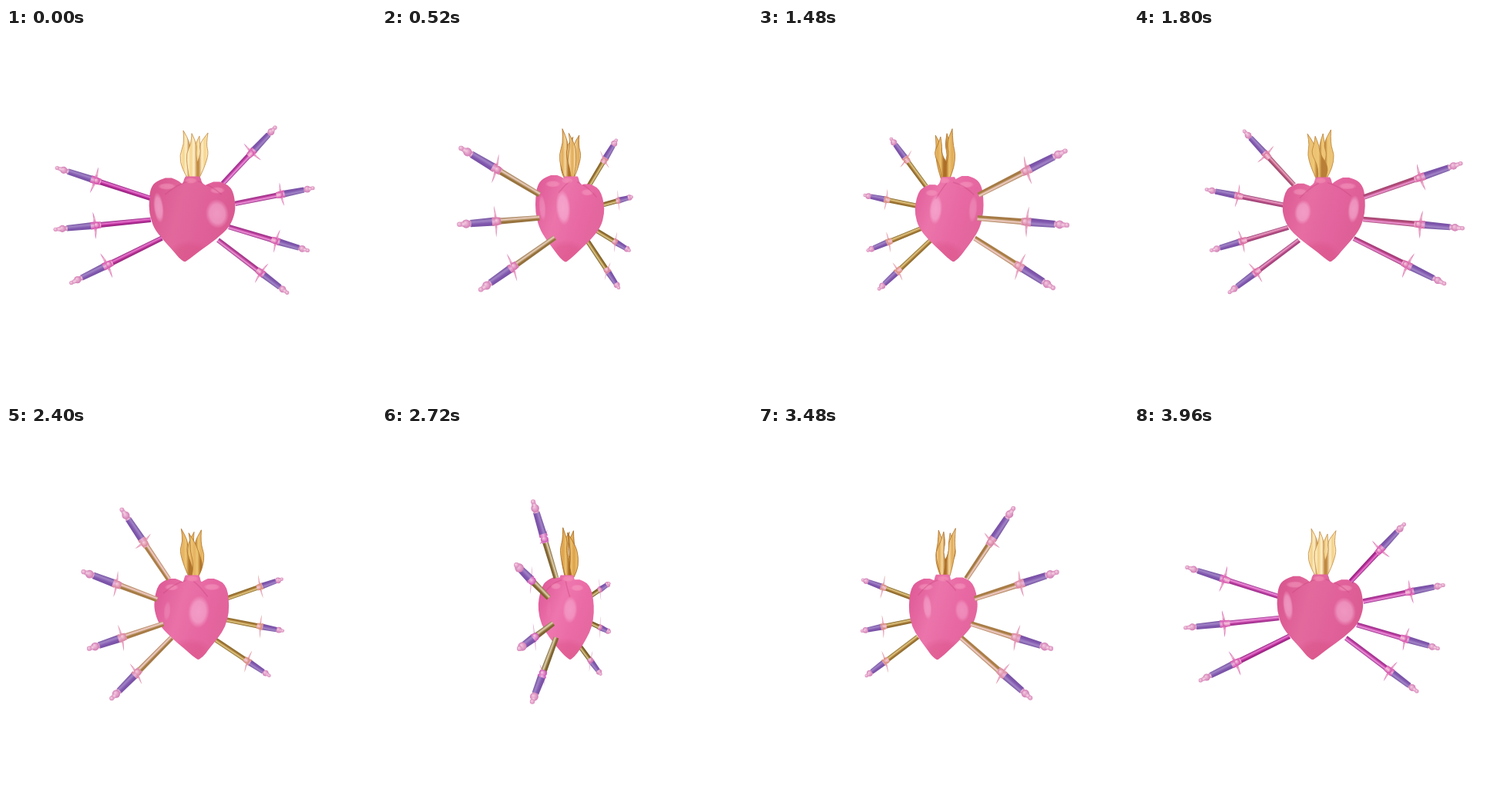
An HTML page with a canvas that plays this animation: 480 px wide and 480 px high, repeating every 4000 ms.

```html
<!DOCTYPE html>
<html lang="en">
<head>
<meta charset="utf-8">
<title>Turning heart</title>
<style>
html, body { margin: 0; width: 100%; height: 100%; overflow: hidden; background: #fff; }
canvas { display: block; width: 100%; height: 100%; }
</style>
</head>
<body>
<canvas id="stage" width="480" height="480"></canvas>
<script>
const ctx = document.getElementById('stage').getContext('2d');
const LOOP = 4000, STEP = 40;
const AXIS = 243, HORIZON = 288, CAMERA = 645;
const RAD = Math.PI / 180;
let turn = 0;

const lerp = (a, b, k) => a + (b - a) * k;

// Model space: x right, y down from the horizon, z towards the viewer.
function project([x, y, z]) {
  const c = Math.cos(turn), s = Math.sin(turn);
  const depth = z * c - x * s;
  const scale = 1 / (1 - depth / CAMERA);
  return { x: AXIS + (x * c + z * s) * scale, y: HORIZON + y * scale, z: depth, s: scale };
}

function mix(a, b, k) {
  const part = (hex, i) => parseInt(hex.substr(1 + i * 2, 2), 16);
  return `rgb(${[0, 1, 2].map(i => Math.round(lerp(part(a, i), part(b, i), k)))})`;
}

function blend(stops, k) {
  const n = Math.min(1, Math.max(0, k)) * (stops.length - 1);
  const i = Math.min(stops.length - 2, Math.floor(n));
  return mix(stops[i], stops[i + 1], n - i);
}

function across(x0, y0, x1, y1, colors) {
  const g = ctx.createLinearGradient(x0, y0, x1, y1);
  colors.forEach((c, i) => g.addColorStop(i / (colors.length - 1), c));
  return g;
}

function rod(p, q, wp, wq, colors) {
  const len = Math.hypot(q.x - p.x, q.y - p.y) || 1;
  const nx = -(q.y - p.y) / len, ny = (q.x - p.x) / len;
  const a = wp * p.s / 2, b = wq * q.s / 2, m = Math.max(a, b);
  ctx.fillStyle = across(p.x - nx * m, p.y - ny * m, p.x + nx * m, p.y + ny * m, colors);
  ctx.beginPath();
  ctx.moveTo(p.x - nx * a, p.y - ny * a);
  ctx.lineTo(q.x - nx * b, q.y - ny * b);
  ctx.lineTo(q.x + nx * b, q.y + ny * b);
  ctx.lineTo(p.x + nx * a, p.y + ny * a);
  ctx.fill();
}

function ball(p, r, light, dark) {
  r *= p.s;
  const g = ctx.createRadialGradient(p.x - r * .3, p.y - r * .3, 0, p.x, p.y, r);
  g.addColorStop(0, light);
  g.addColorStop(1, dark);
  ctx.fillStyle = g;
  ctx.beginPath();
  ctx.arc(p.x, p.y, r, 0, 7);
  ctx.fill();
}

// Swords: tip and entry points as radius, azimuth, height; then size.
const polar = (r, deg, y) => [r * Math.sin(deg * RAD), y, r * Math.cos(deg * RAD)];
const swords = [
  [172, -86.5, -104, 56, -87, -67, 1.09],
  [174, -86.5, -26.5, 55, -88, -39, 1.09],
  [153, -83.5, 40.5, 42, -72, -15, 1.09],
  [106, 93.5, -159, 38, 90, -86, .98],
  [158, 96, -82, 54, 88, -60, .98],
  [151, 96, 0, 46, 90, -30, .98],
  [124, 97, 55.5, 32, 85, -13, .98]
].map(v => {
  const tip = polar(v[0], v[1], v[2]), end = polar(v[3], v[4], v[5]);
  const length = Math.hypot(...tip.map((c, i) => end[i] - c));
  const dir = tip.map((c, i) => (end[i] - c) / length);
  const flat = Math.hypot(dir[0], dir[2]);
  const up = [dir[0] * dir[1] / flat, -flat, dir[2] * dir[1] / flat];
  return { tip, length, dir, up, size: v[6] };
});

function drawSword({ tip, length, dir, up, size }) {
  const at = (d, side = 0) => project(tip.map((c, i) => c + dir[i] * d * size + up[i] * side * size));
  const head = project(tip);
  const near = head.z > 0;
  const facing = 1 - Math.abs(head.z) / Math.hypot(tip[0], tip[2]);
  const k = Math.min(1, facing * 1.1);
  const edge = blend(near ? ['#69562b', '#c28d60', '#8d247c'] : ['#604a20', '#92712f', '#97308a'], k);
  const shine = blend(near ? ['#ded4a8', '#fccfdb', '#ea74d0'] : ['#d9ca8c', '#e6c780', '#f08fdc'], k);
  const shade = blend(near ? ['#80652f', '#b28243', '#b42a94'] : ['#8a6c30', '#ad7c38', '#b93b9d'], k);
  const metal = blend(near ? ['#c746b8', '#dd9590', '#d147a8'] : ['#cc62ba', '#d9925a', '#d24aa9'], k);

  const blade = () => {
    rod(at(45), at(length / size), 7, 6.4, [edge, shine, shade, edge]);
    rod(at(45), at(51), 9, 8, [metal, '#f7c6dc', metal]);
  };
  const guard = () => {
    const a = at(43, 16), b = at(43, -16), inner = at(49), outer = at(42);
    const c = at(46);
    ctx.fillStyle = across(a.x, a.y, b.x, b.y, [metal, '#efb5d0', metal, '#eeb0ce', metal]);
    ctx.beginPath();
    ctx.moveTo(a.x, a.y);
    ctx.quadraticCurveTo(inner.x, inner.y, b.x, b.y);
    ctx.quadraticCurveTo(outer.x, outer.y, a.x, a.y);
    ctx.fill();
    ball(c, 4.2, '#f8cfe2', metal);
  };
  const grip = () => {
    rod(at(11), at(41), 7.4, 9, ['#73519f', '#a183c6', '#8057ae', '#7650a2']);
    rod(at(39), at(43), 9.5, 9.5, [metal, '#e9b3dc', metal]);
  };
  const pommel = () => {
    rod(at(6), at(12), 5, 6.5, ['#c57cb2', '#f1c6e0', '#c47bb0']);
    ball(at(6), 4.5, '#f6cce2', '#d17cb4');
    rod(at(-2), at(4), 4, 6, ['#d58aba', '#f5cee2', '#ce80b4']);
    ball(at(-2), 2.6, '#f8d4e5', '#d98abc');
  };
  const parts = [blade, guard, grip, pommel];
  (near ? parts : parts.reverse()).forEach(draw => draw());
}

// Solid stacks: rows of height, centre x, half width, half depth.
const lobes = [
  [[195, -32, 4, 4], [199, -33, 15, 13], [208, -32, 23, 19], [222, -28, 29, 23], [240, -25, 32, 25],
   [260, -20, 31, 24], [275, -17, 22, 19], [290, -13, 12, 12], [299, -12, 6, 6], [303, -11, 1, 1]],
  [[200, 30, 4, 4], [204, 30, 15, 12], [212, 28, 23, 18], [226, 25, 29, 23], [240, 22, 32, 25],
   [258, 16, 31, 24], [274, 6, 24, 19], [290, -5, 12, 12], [299, -10, 6, 6], [303, -11, 1, 1]],
  [[193, -1, 9, 8], [196, -1, 11, 9], [202, -1, 12, 10], [207, -1, 22, 14], [222, 0, 30, 20],
   [250, -2, 30, 22], [280, -8, 18, 15], [302, -11, 2, 2]]
];

// Flame tongues: rows of height, x, z, half width.
const tongues = [
  [[196, -1, -2, 5], [182, -5, -5, 7], [164, 5, -9, 6], [152, 5, -5, 3.5], [140, 8, -1, 0]],
  [[196, 2, 0, 5], [182, 8, 1, 6], [163, 15, 2, 5], [151, 12, 0, 4.5], [136, 19, 0, 0]],
  [[196, -2, 0, 5], [182, -8, 0, 7], [165, -13, 0, 5], [151, -7, 1, 5], [133, -13, 0, 0]],
  [[196, 0, 2, 5], [180, -1, 5, 7], [164, -3, 8, 6], [152, 1, 5, 4], [137, -2, 1, 0]]
];

function sides(path, rows) {
  const run = pts => {
    path.lineTo(pts[0][0], pts[0][1]);
    for (let i = 1; i < pts.length - 1; i++) {
      const [x, y] = pts[i], [nx, ny] = pts[i + 1];
      path.quadraticCurveTo(x, y, (x + nx) / 2, (y + ny) / 2);
    }
    path.lineTo(...pts[pts.length - 1]);
  };
  path.moveTo(rows[0].x - rows[0].w, rows[0].y);
  run(rows.map(r => [r.x - r.w, r.y]));
  run(rows.map(r => [r.x + r.w, r.y]).reverse());
  path.closePath();
}

function drawFlame() {
  const front = Math.cos(turn), side = Math.abs(Math.sin(turn));
  const edge = mix('#c28b42', '#a5651d', side);
  const glow = front > 0 ? mix('#fff0cb', '#f3d190', side) : mix('#f0cb78', '#ecc26f', side);
  const rows = tongues.map(t => t.map(([y, x, z, w]) => {
    const p = project([x, y - HORIZON, z]);
    return { ...p, w: w * p.s * (1 - .25 * side) };
  }));
  rows.sort((a, b) => a[2].z - b[2].z).forEach(t => {
    const path = new Path2D(), m = t[2];
    sides(path, t);
    ctx.fillStyle = across(m.x - 8, 0, m.x + 8, 0, [edge, glow, mix('#f5d48c', '#d99a42', side), glow, edge]);
    ctx.fill(path);
    ctx.strokeStyle = edge;
    ctx.lineWidth = .8;
    ctx.stroke(path);
  });
}

// Reflections: time, x, y, width, height, opacity.
const glints = [
  [[0, 198, 233, 13, 40, .6], [520, 208, 233, 9, 34, .35], [1120, 220, 235, 7, 34, 0], [1121, 272, 235, 7, 34, 0],
   [1800, 285, 235, 15, 36, .6], [2400, 250, 241, 28, 42, .6], [3040, 238, 236, 10, 28, .4], [4000, 198, 233, 13, 40, .6]],
  [[0, 274, 241, 30, 38, .6], [520, 235, 233, 19, 46, .65], [1160, 242, 232, 12, 46, .6], [1800, 219, 239, 22, 32, .6],
   [2400, 209, 240, 9, 26, .25], [2800, 218, 238, 6, 22, 0], [2801, 258, 238, 6, 22, 0],
   [3040, 257, 238, 9, 22, .3], [4000, 274, 241, 30, 38, .6]]
];

function soft(x, y, w, h, color, alpha, tilt = 0) {
  ctx.save();
  ctx.translate(x, y);
  ctx.rotate(tilt);
  ctx.scale(w / 2, h / 2);
  const g = ctx.createRadialGradient(0, 0, 0, 0, 0, 1);
  g.addColorStop(0, `rgba(${color},${alpha})`);
  g.addColorStop(.65, `rgba(${color},${alpha * .85})`);
  g.addColorStop(1, `rgba(${color},0)`);
  ctx.fillStyle = g;
  ctx.fillRect(-1, -1, 2, 2);
  ctx.restore();
}

function drawHeart(time) {
  const c = Math.cos(turn), s = Math.sin(turn);
  const path = new Path2D();
  lobes.forEach(rows => sides(path, rows.map(([y, x, a, b]) => {
    const p = project([x, y - HORIZON, 4]);
    return { ...p, w: Math.hypot(a * c, b * s) * p.s };
  })));
  const half = 27 + 29 * Math.abs(c), side = Math.abs(s);
  ctx.fillStyle = across(AXIS - half, 225, AXIS + half, 255,
    [mix('#d9578f', '#e25e9c', side), mix('#e2689c', '#ef78b0', side),
     mix('#e0609a', '#eb6ba6', side), mix('#d8598e', '#e56aa0', side)]);
  ctx.fill(path);

  ctx.save();
  ctx.clip(path);
  soft(AXIS - 4, 298, 62, 46, '208,70,116', .32);
  // Lobe crowns and the folds beside the collar
  [[-34, -82, 4, 24], [31, -77, 4, 20]].forEach(([x, y, z, w]) => {
    const p = project([x, y, z]);
    soft(p.x, p.y, w * (.5 + .5 * Math.abs(c)), 9, '249,166,199', .5);
  });
  ctx.lineWidth = 1.6;
  [-1, 1].forEach(d => {
    const a = project([d * 6, -88, 8]), b = project([d * 20, -84, 14]), e = project([d * 36, -70, 16]);
    ctx.strokeStyle = 'rgba(199,70,125,.4)';
    ctx.beginPath();
    ctx.moveTo(a.x, a.y);
    ctx.quadraticCurveTo(b.x, b.y, e.x, e.y);
    ctx.stroke();
  });
  const collar = project([-1, -90, 0]);
  soft(collar.x - 2, collar.y, 16, 8, '246,150,184', .6);

  glints.forEach(track => {
    const i = track.findIndex(k => k[0] > time) - 1;
    const from = track[i], to = track[i + 1];
    const k = (time - from[0]) / (to[0] - from[0]);
    const [, x, y, w, h, alpha] = from.map((v, j) => lerp(v, to[j], k));
    soft(x, y, w, h, '250,190,222', alpha, -.12 * Math.cos(turn));
  });
  ctx.restore();
}

function draw(now) {
  const time = Math.floor(now / STEP) * STEP % LOOP;
  turn = time / LOOP * Math.PI * 2;
  ctx.clearRect(0, 0, 480, 480);
  const sorted = swords.map(sword => ({ sword, z: project(sword.tip).z })).sort((a, b) => a.z - b.z);
  sorted.filter(o => o.z <= 0).forEach(o => drawSword(o.sword));
  drawFlame();
  drawHeart(time);
  sorted.filter(o => o.z > 0).forEach(o => drawSword(o.sword));
}

let start;
function tick(now) {
  start ??= now;
  draw(now - start);
  requestAnimationFrame(tick);
}
draw(0);
requestAnimationFrame(tick);
</script>
</body>
</html>
```
